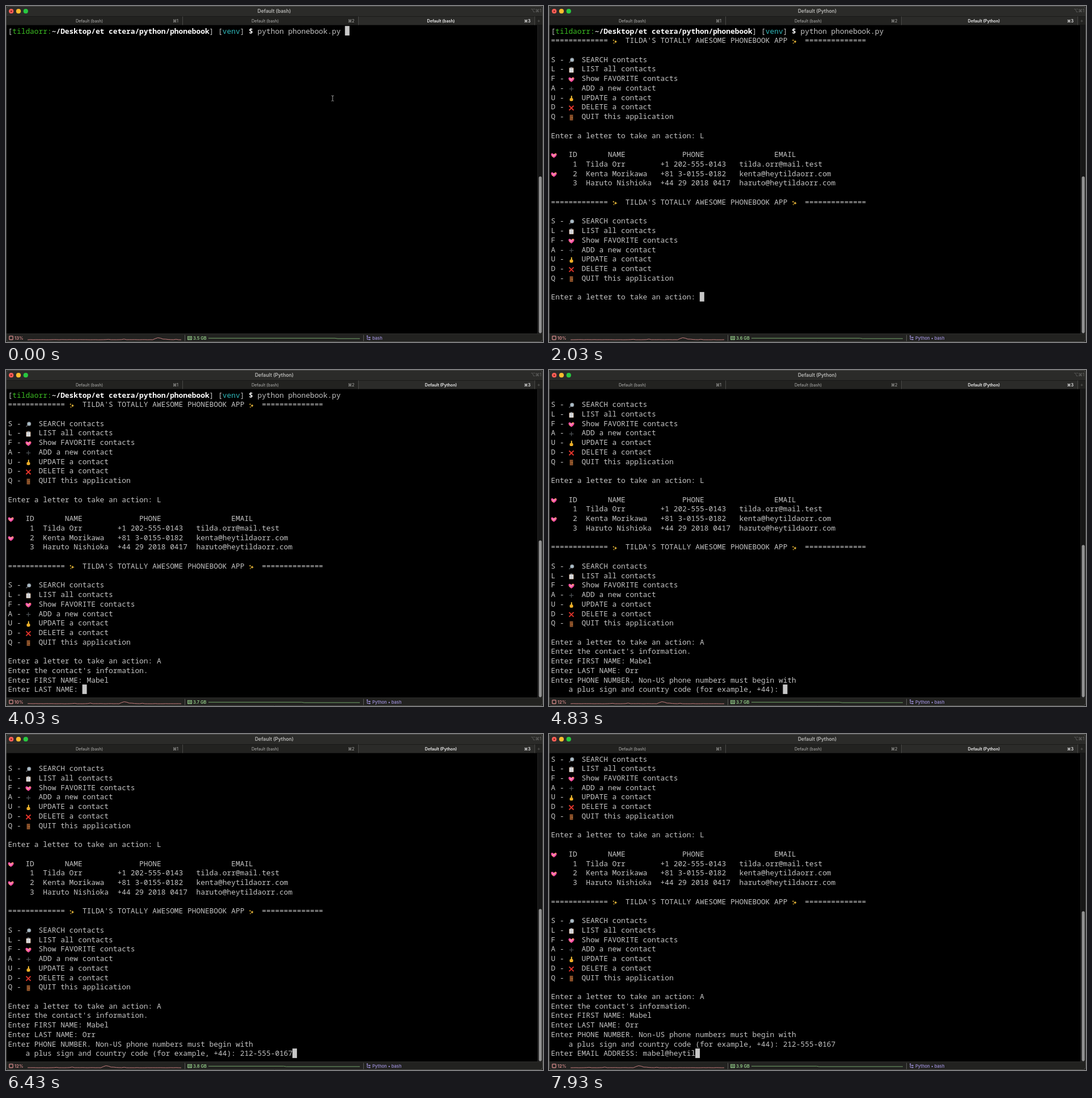
An HTML page with a canvas that plays this animation: 947x592 px, repeating every 8 s.

```html
<!DOCTYPE html>
<html lang="en">
<head>
<meta charset="utf-8">
<title>Phonebook terminal</title>
<style>
html, body { margin: 0; width: 100%; height: 100%; overflow: hidden; background: #000; }
canvas { display: block; width: 947px; height: 592px; }
</style>
</head>
<body>
<canvas id="stage"></canvas>
<script>
const W = 947, H = 592, LOOP = 8000;
const canvas = document.getElementById('stage');
const g = canvas.getContext('2d');
const dpr = window.devicePixelRatio || 1;
canvas.width = W * dpr;
canvas.height = H * dpr;

const MONO = '"Noto Sans Mono", "DejaVu Sans Mono", monospace';
const SANS = 'Inter, "DejaVu Sans", sans-serif';
const COL = 7.72, ROW = 16.74, LEFT = 3.5, TOP = 34.7, ROWS = 32;
const GRAY = '#c4c4c4';

// Terminal output, as a log of [time, text]
const HEAD = `${'='.repeat(13)} ✨  TILDA'S TOTALLY AWESOME PHONEBOOK APP ✨  ${'='.repeat(14)}\n\n`;
const MENU = HEAD + [
  'S - 🔎  SEARCH contacts',
  'L - 📋  LIST all contacts',
  'F - 💖  Show FAVORITE contacts',
  'A - ➕  ADD a new contact',
  'U - ☝  UPDATE a contact',
  'D - ❌  DELETE a contact',
  'Q - 🚪  QUIT this application'
].join('\n') + '\n\nEnter a letter to take an action: ';

const contact = (mark, id, name, phone, mail) =>
  `${mark}    ${id}  ${name.padEnd(17)}${phone.padEnd(18)}${mail}\n`;
const TABLE = '💖   ID       NAME             PHONE                EMAIL\n' +
  contact(' ', 1, 'Tilda Orr', '+1 202-555-0143', 'tilda.orr@mail.test') +
  contact('💖', 2, 'Kenta Morikawa', '+81 3-0155-0182', 'kenta@heytildaorr.com') +
  contact(' ', 3, 'Haruto Nishioka', '+44 29 2018 0417', 'haruto@heytildaorr.com');

const log = [
  [0, '[tildaorr:~/Desktop/et cetera/python/phonebook] [venv] $ python phonebook.py '],
  [230, '\n'],
  [500, MENU],
  [1160, 'L'],
  [1400, '\n\n' + TABLE + '\n' + MENU],
  [2330, 'A'],
  [2800, "\nEnter the contact's information.\nEnter FIRST NAME: "],
  ...typed('Mabel', [3330, 3430, 3500, 3560, 3630]),
  [3960, '\nEnter LAST NAME: '],
  ...typed('Orr', [4360, 4460, 4560]),
  [4830, '\nEnter PHONE NUMBER. Non-US phone numbers must begin with\n' +
    '    a plus sign and country code (for example, +44): '],
  ...typed('212-555-0167', [5200, 5260, 5430, 5530, 5900, 5960, 6030, 6100, 6160, 6230, 6300, 6430]),
  [6630, '\nEnter EMAIL ADDRESS: '],
  ...typed('mabel@heytil', [7200, 7230, 7260, 7300, 7360, 7500, 7560, 7630, 7700, 7760, 7830, 7930])
];

function typed(text, times) {
  return times.map((time, i) => [time, text[i]]);
}

// Drawing helpers
function rect(x, y, w, h, color) {
  g.fillStyle = color;
  g.fillRect(x, y, w, h);
}
function round(x, y, w, h, r, color) {
  g.fillStyle = color;
  g.beginPath();
  g.roundRect(x, y, w, h, r);
  g.fill();
}
function dot(x, y, r, color) {
  g.fillStyle = color;
  g.beginPath();
  g.arc(x, y, r, 0, Math.PI * 2);
  g.fill();
}
function line(points, color, width) {
  g.strokeStyle = color;
  g.lineWidth = width;
  g.beginPath();
  points.forEach(([x, y]) => g.lineTo(x, y));
  g.stroke();
}
function label(text, x, y, size, weight, color, align = 'center') {
  g.font = `${weight} ${size}px ${SANS}`;
  g.textAlign = align;
  g.textBaseline = 'alphabetic';
  g.fillStyle = color;
  g.fillText(text, x, y);
}
function star(x, y, r) {
  g.fillStyle = '#ffc83d';
  g.beginPath();
  g.moveTo(x, y - r);
  for (let i = 1; i <= 4; i++) {
    const a = i * Math.PI / 2;
    g.quadraticCurveTo(x, y, x + r * Math.sin(a), y - r * Math.cos(a));
  }
  g.fill();
}
function heart(x, y, s, color) {
  g.fillStyle = color;
  g.beginPath();
  g.moveTo(x, y + s);
  g.bezierCurveTo(x - 2 * s, y - s * 0.2, x - s, y - s * 1.6, x, y - s * 0.45);
  g.bezierCurveTo(x + s, y - s * 1.6, x + 2 * s, y - s * 0.2, x, y + s);
  g.fill();
}

// Small pictures, drawn around the origin
const icons = {
  '✨'() {
    star(0.8, 0.4, 3.6);
    star(-2.8, -2, 1.8);
    star(-2.2, 2.9, 1.5);
  },
  '🔎'() {
    line([[-0.8, 1], [-4, 4]], '#55585c', 1.8);
    dot(1.2, -0.9, 3.6, '#85898e');
    dot(1.2, -0.9, 2.6, '#a9bdc8');
  },
  '📋'() {
    round(-4.2, -4, 8.4, 9, 0.8, '#8b6a4c');
    rect(-3.5, -3, 7, 7.5, '#e6e7e9');
    for (let y = -1; y < 4; y += 1.7) rect(-2.5, y, 5, 0.6, '#a7abb0');
    round(-2, -4.8, 4, 2, 0.6, '#8f949a');
  },
  '💖'() {
    heart(0, 0.2, 4.4, '#f5479d');
    heart(-0.3, -0.3, 2.6, '#ff79bd');
    star(2.5, -2.3, 2);
    star(-2.4, 1.4, 1.6);
  },
  '➕'() {
    rect(-3.8, -0.6, 7.6, 1.3, '#4c5155');
    rect(-0.65, -3.8, 1.3, 7.6, '#4c5155');
  },
  '☝'() {
    round(-0.7, -4.8, 1.9, 6, 0.9, '#ffcb3a');
    round(-3, -0.6, 6, 5.4, 1.8, '#f8b92b');
    line([[-2.4, 1.6], [1.6, 1.6]], '#c97f16', 0.6);
  },
  '❌'() {
    line([[-4, -3.8], [4, 4.2]], '#e8352c', 1.9);
    line([[4, -3.8], [-4, 4.2]], '#e8352c', 1.9);
  },
  '🚪'() {
    rect(-3, -4.8, 6, 10, '#6b3f22');
    rect(-2.3, -4.1, 4.6, 9.2, '#96592f');
    rect(-1.5, -3.3, 3, 3, '#834a25');
    rect(-1.5, 1.2, 3, 3, '#834a25');
    dot(1.7, 0.6, 0.6, '#e0b04a');
  }
};

function promptStyle(c) {
  if (c > 0 && c < 10) return ['#3bbd22', 400];
  if ((c > 9 && c < 46) || c === 55) return ['#ffffff', 700];
  if (c > 48 && c < 53) return ['#2fb9bb', 400];
  return [GRAY, 400];
}

function drawLine(text, row, isPrompt) {
  const y = TOP + row * ROW;
  Array.from(text).forEach((ch, c) => {
    const x = LEFT + c * COL;
    if (icons[ch]) {
      g.save();
      g.translate(x + 5.1, y + 10.9);
      icons[ch]();
      g.restore();
    } else if (ch !== ' ') {
      const [color, weight] = isPrompt ? promptStyle(c) : [GRAY, 400];
      g.font = `${weight} ${COL / 0.6}px ${MONO}`;
      g.fillStyle = color;
      g.fillText(ch, x, y + 13.8);
    }
  });
}

function drawTerminal(t) {
  const lines = log.filter(e => e[0] <= t).map(e => e[1]).join('').split('\n');
  const scroll = Math.max(0, lines.length - ROWS);
  g.textAlign = 'left';
  g.textBaseline = 'alphabetic';
  lines.slice(scroll).forEach((text, r) => drawLine(text, r, r + scroll === 0));
  const last = lines.length - 1;
  rect(LEFT + Array.from(lines[last]).length * COL - 0.2, TOP + (last - scroll) * ROW + 0.5, 8, ROW, '#c7c7c7');

  rect(937, 34, 9, 543, '#161616');
  rect(937, 34, 0.7, 543, '#2b2b2b');
  const top = 300.3 + scroll * 4;
  round(939.6, top, 5.2, 576.4 - top, 2.6, '#929292');

  if (t < 230) {
    line([[573.8, 158], [575.3, 158], [576, 159], [576.7, 158], [578.2, 158]], '#a8a8a8', 0.9);
    line([[576, 159], [576, 166.5]], '#a8a8a8', 1);
    line([[573.8, 167.3], [575.3, 167.3], [576, 166.4], [576.7, 167.3], [578.2, 167.3]], '#a8a8a8', 0.9);
  }
}

function drawChrome(job) {
  rect(0, 0, W, 18, '#2b2b29');
  rect(0, 18, W, 16, '#222220');
  rect(622, 18, 310, 16, '#2b2b29');
  rect(0, 18, W, 0.7, '#151514');
  rect(0, 33.3, W, 0.7, '#111110');
  [311, 621, 932].forEach(x => rect(x, 18.5, 1, 15, '#484846'));

  dot(9.2, 9.2, 4.1, '#fe5f57');
  dot(9.2, 9.2, 1.2, '#7d1512');
  dot(22, 9.2, 4.1, '#febc2e');
  dot(34.8, 9.2, 4.1, '#28c840');

  const title = `Default (${job})`;
  label(title, 473, 12, 8.6, 600, '#b9b9b7');
  label('⌥⌘1', 944, 11, 7.6, 400, '#70706e', 'right');
  label('Default (bash)', 147, 28.6, 7.2, 400, '#b4b4b2');
  label('⌘1', 304, 28.6, 7.2, 400, '#b4b4b2', 'right');
  label('Default (bash)', 457, 28.6, 7.2, 400, '#b4b4b2');
  label('⌘2', 614.5, 28.6, 7.2, 400, '#b4b4b2', 'right');
  label(title, 767, 28.6, 7.1, 600, '#f4f4f4');
  label('⌘3', 925, 28.6, 7.1, 600, '#f4f4f4', 'right');
  label('+', 939.5, 29, 9, 400, '#5c5c5a');
}

// Status bar: one new sample per tick, graphs slide to the left
const STEP = 4.58;
const cpu = [13, 12, 12, 11, 12, 10, 10, 10, 10, 10, 9, 8, 9, 10, 9, 12, 11, 12, 11, 11, 12, 11, 12, 11, 12];
const bumps = { 31: 0.5, 37: 0.9, 49: 2, 50: 3.5, 51: 2.8, 52: 0.9, 53: 0.9, 54: 0.4, 57: 0.8 };

function load(i) {
  const r = Math.sin(i * 12.9898) * 43758.5453;
  return (r - Math.floor(r)) * 0.35 + (bumps[i] || 0);
}

function drawStatus(t, job) {
  const n = 1 + Math.floor((t - 26) / (1000 / 3));
  rect(0, 577.5, W, 14.5, '#222220');
  rect(0, 577.3, W, 0.7, '#3a3a38');
  [315, 630].forEach(x => rect(x, 579.5, 1, 11, '#5a5a58'));

  const red = '#dc9090', green = '#95cf8a', violet = '#a092dd';
  g.strokeStyle = red;
  g.lineWidth = 1.1;
  g.strokeRect(6, 581.8, 6, 6);
  [7.2, 9, 10.8].forEach(x => {
    rect(x - 0.3, 580.6, 0.6, 1, red);
    rect(x - 0.3, 588, 0.6, 1, red);
  });
  [583, 584.8, 586.6].forEach(y => {
    rect(4.8, y - 0.3, 1, 0.6, red);
    rect(12.2, y - 0.3, 1, 0.6, red);
  });
  label(cpu[n] + '%', 30.5, 587.6, 7.5, 600, red, 'right');

  g.save();
  g.beginPath();
  g.rect(38, 579, 271, 12);
  g.clip();
  const points = [];
  for (let i = n - 1; i <= n + 59; i++) points.push([309 - (59 + n - i) * STEP, 588.1 - load(i)]);
  line(points, '#c77d7d', 1);
  g.restore();

  g.strokeStyle = green;
  g.lineWidth = 1;
  g.strokeRect(320.5, 582.3, 7, 5.2);
  rect(322, 583.4, 1.3, 3, green);
  rect(324.7, 583.4, 1.3, 3, green);
  [321.5, 324, 326.5].forEach(x => rect(x - 0.4, 588, 0.8, 0.9, green));
  const gb = 3.5 + [1, 10, 17, 22].filter(k => n >= k).length / 10;
  label(gb.toFixed(1) + ' GB', 330, 587.6, 7.45, 600, green, 'left');
  const edge = 585 - 4.52 * n;
  line([[357, 585.3], [edge - 5, 585.3], [edge, 586], [624, 586]], '#73a56a', 1);

  line([[637, 581], [637, 587.5], [639.5, 587.5]], violet, 0.9);
  line([[637, 584], [639.5, 584]], violet, 0.9);
  rect(636, 580.6, 2.2, 1.6, violet);
  rect(639.6, 583.1, 3, 1.8, violet);
  rect(639.6, 586.6, 3, 1.8, violet);
  label(job === 'bash' ? 'bash' : 'Python • bash', 646, 587.6, 7.6, 500, violet, 'left');
}

function draw(t) {
  const job = t < 430 ? 'bash' : 'Python';
  g.setTransform(dpr, 0, 0, dpr, 0, 0);
  rect(0, 0, W, H, '#000');
  drawTerminal(t);
  drawChrome(job);
  drawStatus(t, job);
  g.strokeStyle = '#4b4b49';
  g.lineWidth = 1;
  g.beginPath();
  g.roundRect(0.5, 0.5, W - 1, H - 1, 5);
  g.stroke();
}

let start;
function tick(now) {
  if (start === undefined) start = now;
  draw((now - start) % LOOP);
  requestAnimationFrame(tick);
}
draw(0);
requestAnimationFrame(tick);
</script>
</body>
</html>
```
